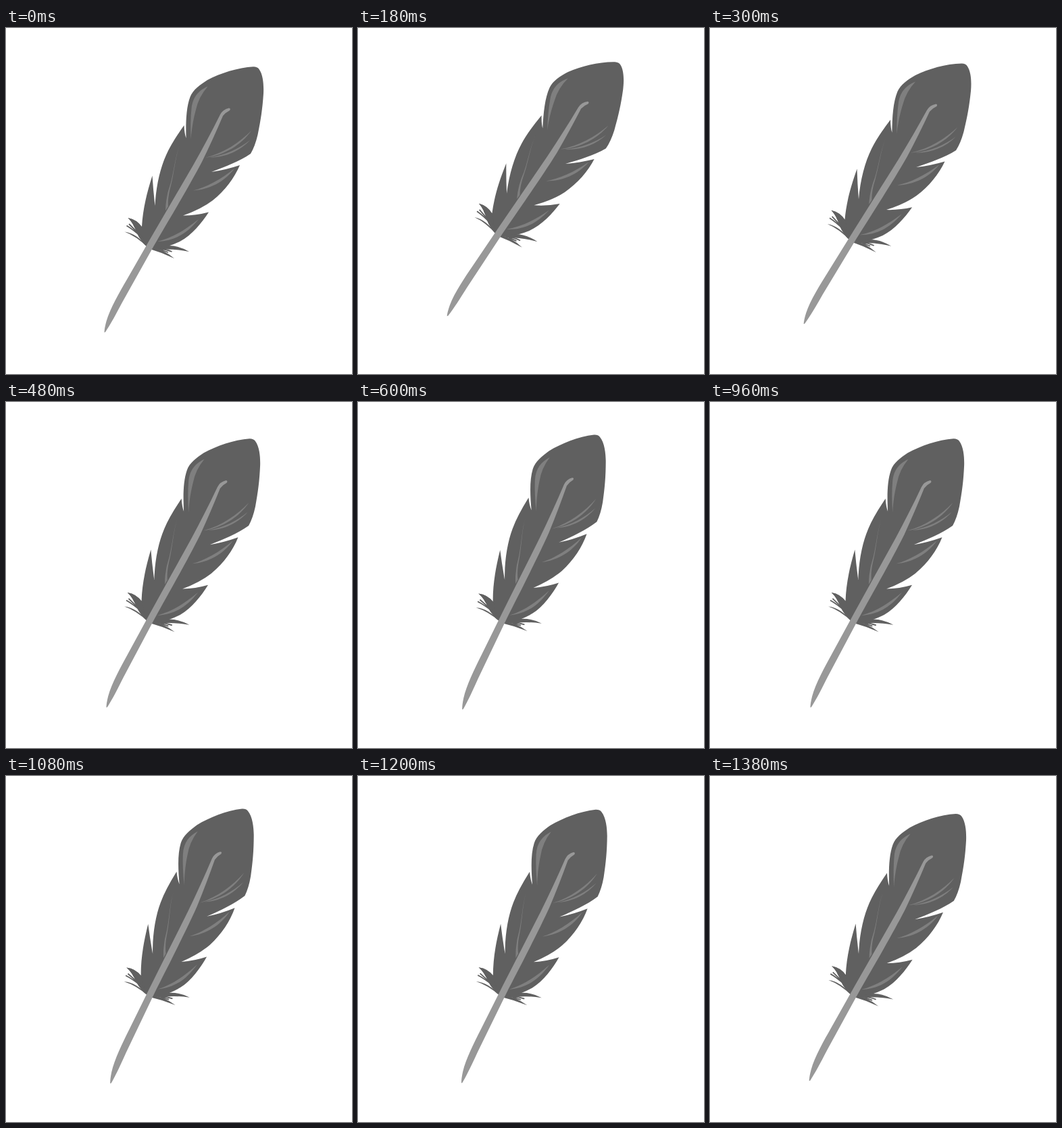
An HTML page for the animation above (1.44 s loop, 512 by 512 pixels).

```html
<!DOCTYPE html>
<html lang="en">
<head>
<meta charset="utf-8">
<title>Feather</title>
<style>
  html, body { margin: 0; width: 100%; height: 100%; overflow: hidden; background: #fff; }
  svg { display: block; width: 100vw; height: 100vh; }
  .vane { fill: #606060; }
  .barb { fill: none; stroke: #606060; stroke-width: 1.8; }
  .slit { fill: #7f7f7f; }
  .quill { fill: #989898; }
</style>
</head>
<body>
<svg viewBox="0 0 512 512">
  <g id="feather">
    <path class="vane" d="
      M210 325 Q199 316 193 302 Q189 290 180.500 281 Q194 284 201 294
      C202.500 269 207.500 247 216.500 218.500 Q218 242 220.500 263
      C222 234 228 208 237 188 Q245 170 263.500 144 Q264 156 266.500 163
      C266 140 266.500 118 272.500 102 C276.500 91.500 287 84 298 77
      C317 67 343 58.500 366 57.300 Q372 57.300 374.500 61
      C381 70 381.500 86 381 97 C379.500 120 377 136 372.500 158
      Q368.500 175 362 186 C345 197.500 325 205 304 213
      Q325 210 346 203 C338 222 324 240.500 306 255 Q289 268 262 277.500
      Q281 277.500 300 272.500 C290 288 275 306.500 258 315.500 Q243 323 224 327 Z"/>
    <path class="vane" d="M180.500 281 Q194 283 202 296 L205 312 Q195 304 189 293 Q187 286 180.500 281 Z"/>
    <path class="vane" d="M224 325 Q247 317 271 331 Q248 326 224 328 Z"/>
    <path class="vane" d="M210 323 Q233 327 249 341 Q230 332 210 326 Z"/>
    <path class="vane" d="M175.500 301.500 Q194 304 210 325 Q193 308 175.500 301.500 Z"/>
    <path class="barb" d="M178.500 292.500 Q188 298 200 309 M182 290 L196 304 M226 327 Q236 327 245.500 331 M228 328 L240 332"/>

    <path class="slit" d="M298.500 86.500 C286 92 276.500 101 274.500 119 Q272.500 138 273.500 165 C275 146 278 132 281 121 Q285 102 298.500 86.500 Z"/>
    <path class="slit" d="M257 173 C250.500 190 248.500 212 243.500 230 Q236.500 249 236 270 L240 264 Q239 251 244 233 C249 213 250.500 191 257 173 Z"/>
    <path class="slit" d="M295 192 C322 185 345 170 363 152 C348 173 324 188 295 192 Z"/>
    <path class="slit" d="M302 191.500 C325 188 344 179 361 166 C346 182 325 191.500 302 191.500 Z"/>
    <path class="slit" d="M277 240.500 C296 236 318 224 338 208 C323 228 301 239 277 240.500 Z"/>
    <path class="slit" d="M224 316 C247 310 265 299 285 283 C268 304 250 315 224 316 Z"/>

    <path class="quill" d="
      M330 118.500 Q321 120.500 317 128 C304 154 291 178 277 203
      L214 311 L179 372
      C168 391 154 415 148.500 434 Q145.500 445 145.500 450.500 L147 450
      C155 438 163 423 172 406 L219 322
      C241 284 270 236 290 198 Q307 163 321 130 Q325 125 331 122 Q333 119 330 118.500 Z"/>
  </g>
</svg>
<script>
  const LOOP = 1440, STEP = 60, LIFT = 404, SWING = 480;
  const PIVOT = [220, 316];
  const feather = document.getElementById('feather');

  // One lift with a clockwise turn, then a steady swing about the pivot.
  function pose(t) {
    if (t < LIFT) {
      const up = (1 - Math.cos(2 * Math.PI * t / LIFT)) / 2;
      const settle = (1 - Math.cos(Math.PI * t / LIFT)) / 2;
      return { x: -4.4 * up, y: -18.9 * up, turn: 4.5 * up - 0.48 * settle };
    }
    const phase = 2 * Math.PI * (t - LIFT) / SWING;
    return { x: 0, y: 0, turn: 1.73 * Math.cos(phase) - 2.21 };
  }

  function draw(now) {
    const t = Math.floor(now % LOOP / STEP) * STEP;
    const { x, y, turn } = pose(t);
    feather.setAttribute('transform', `translate(${x} ${y}) rotate(${turn} ${PIVOT})`);
    requestAnimationFrame(draw);
  }
  draw(performance.now());
</script>
</body>
</html>
```
